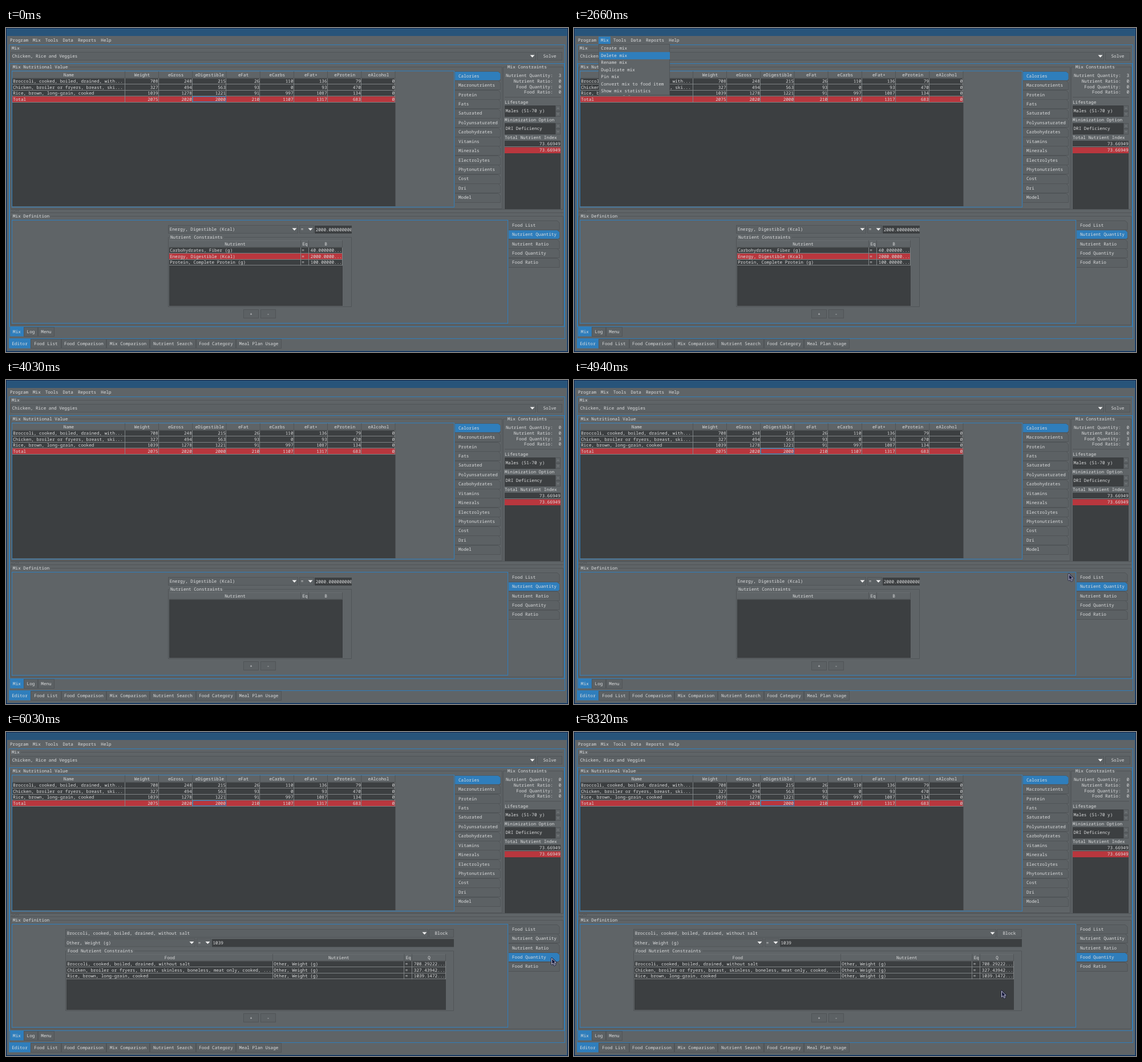
Write an HTML page that moves like this. It is 985 px wide and 569 px high and loops after 9.81 s.

```html
<!DOCTYPE html>
<html lang="en">
<head>
<meta charset="utf-8">
<title>Mix editor</title>
<style>
  html, body { margin: 0; width: 100%; height: 100%; overflow: hidden; background: #5f6467; }
  svg { display: block; width: 985px; height: 569px; }
  text { font: 7.65px "Noto Sans Mono", "DejaVu Sans Mono", monospace; fill: #dcddde;
         text-rendering: geometricPrecision; white-space: pre; }
</style>
</head>
<body>
<svg id="stage" viewBox="0 0 985 569" xmlns="http://www.w3.org/2000/svg"></svg>
<script>
const LOOP = 9810;
const BG = '#5f6467', DARK = '#3c3f41', EDGE = '#505457', LIGHT = '#686d70',
      BLUE = '#2f7ebc', RED = '#b9373e', GRID = '#7f8385', FIELD = '#5c6164';

// Drawing helpers: all boxes are given by two corners, text by its vertical middle.
const rect = (x, y, x2, y2, fill = 'none', stroke = 'none') =>
  `<rect x="${x}" y="${y}" width="${x2 - x}" height="${y2 - y}" fill="${fill}" stroke="${stroke}"/>`;
const path = (d, stroke, fill = 'none') => `<path d="${d}" fill="${fill}" stroke="${stroke}"/>`;
const text = (x, y, s, anchor = 'start') =>
  `<text x="${x}" y="${y + 2.7}" text-anchor="${anchor}">${s}</text>`;
const hline = (x, x2, y, c) => path(`M${x} ${y}H${x2}`, c);
const vline = (x, y, y2, c) => path(`M${x} ${y}V${y2}`, c);
const group = (id, body) => `<g id="${id}">${body}</g>`;
const arrow = (x, y) => path(`M${x - 4} ${y - 2}h8l-4 4.2z`, 'none', '#f4f4f4');
const button = (x, y, x2, y2, s) =>
  rect(x + .5, y + .5, x2 - .5, y2 - .5, FIELD, EDGE) + text((x + x2) / 2, (y + y2) / 2, s, 'middle');
const combo = (x, y, x2, s) =>
  rect(x + .5, y + .5, x2 - .5, y + 14.5, FIELD, EDGE) +
  text(x + 2.7, y + 7.5, s) + arrow(x2 - 6.5, y + 7.5);

function titled(x, y, x2, y2, title, inset = 4) {
  const start = x + inset, end = start + 2 + title.length * 4.6;
  return path(`M${start - 2} ${y + .5}H${x + .5}V${y2 + .5}H${x2 + .5}V${y + .5}H${end}`, EDGE) +
    text(start, y, title);
}

function table(cols, top, bottom, heads, rows, { red = -1, right = false } = {}) {
  const x = cols[0], x2 = cols[cols.length - 1], body = top + 12.5, h = 10.6;
  let s = rect(x, top, x2, body, BG) + rect(x, body, x2, bottom, DARK);
  s += hline(x, x2, top + .5, LIGHT) + hline(x, x2, body - .5, EDGE);
  heads.forEach((name, i) => {
    s += text((cols[i] + cols[i + 1]) / 2, top + 6.3, name, 'middle') +
         vline(cols[i + 1] - .5, top, body, EDGE);
  });
  rows.forEach((row, r) => {
    const y = body + r * h;
    if (r === red) s += rect(x, y, x2, y + h - .6, RED);
    row.forEach((v, c) => {
      s += c && right ? text(cols[c + 1] - 1.5, y + 5, v, 'end')
                      : text(cols[c] + (c === cols.length - 2 ? 2.8 : 1.2), y + 5, v);
    });
    s += hline(x, x2, Math.round(y + h) - .5, GRID);
  });
  if (rows.length)
    for (const c of cols.slice(1)) s += vline(Math.floor(c) - .5, body, body + rows.length * h, GRID);
  return s;
}

const tabY = (y, i) => y + i * 16.43;
const sideTab = (x, x2, y) =>
  path(`M${x} ${y + .8}H${x2 - 4}L${x2} ${y + 4}V${y + 13.5}L${x2 - 2} ${y + 15.7}H${x}z`, 'none', BLUE);
const sideTabs = (x, x2, y, names) => names.map((n, i) => {
  const top = Math.round(tabY(y, i)) + .5;
  return path(`M${x} ${top}H${x2 - 4}L${x2} ${top + 3.5}V${top + 16}H${x}`, EDGE, FIELD);
}).join('');
const sideLabels = (x, y, names) =>
  names.map((n, i) => text(x + 6, tabY(y, i) + 8, n)).join('');

const bottomTabs = (y, edges, names) => names.map((n, i) => {
  const x = edges[i], x2 = edges[i + 1];
  return (i ? rect(x + .5, y + .5, x2 - .5, y + 16.5, FIELD, EDGE) : rect(x, y, x2, y + 16.5, BLUE)) +
    text((x + x2) / 2, y + 8.7, n, 'middle');
}).join('');

function spinner(y, s) {
  const tri = (cy, d) => path(`M965 ${cy + d}h5l-2.5 ${-2.4 * d}z`, 'none', '#73777a');
  return rect(874, y, 972, y + 20, FIELD) + rect(874, y, 963, y + 20, DARK) +
    rect(963.5, y + .5, 971.5, y + 9.5, BG, EDGE) + rect(963.5, y + 10.5, 971.5, y + 19.5, BG, EDGE) +
    tri(y + 5, 1) + tri(y + 15, -1) + text(875.5, y + 9.6, s);
}

const counts = values => values.map((v, i) => text(973, 83.3 + i * 9.8, v, 'end')).join('');

const views = ['Calories', 'Macronutrients', 'Protein', 'Fats', 'Saturated', 'Polyunsaturated',
  'Carbohydrates', 'Vitamins', 'Minerals', 'Electrolytes', 'Phytonutrients', 'Cost', 'Dri', 'Model'];
const parts = ['Food List', 'Nutrient Quantity', 'Nutrient Ratio', 'Food Quantity', 'Food Ratio'];
const menu = ['Create mix', 'Delete mix', 'Rename mix', 'Duplicate mix', 'Pin mix',
  'Convert mix to food item', 'Show mix statistics'];

function windowFrame() {
  const bar = [['Program', 7], ['Mix', 47], ['Tools', 68.7], ['Data', 99.5], ['Reports', 126], ['Help', 166.3]];
  return rect(0, 0, 985, 569, BG) + rect(0, 0, 985, 14, '#28547a') +
    rect(1.5, 1.5, 983.5, 567.5, 'none', '#2b587e') + rect(.5, .5, 984.5, 568.5, 'none', '#0d2148') +
    bar.map(([s, x]) => text(x, 21, s)).join('') +
    rect(5.5, 29.5, 979.5, 545.5, 'none', BLUE) + rect(6.5, 62.5, 978.5, 524.5, 'none', BLUE) +
    bottomTabs(525, [7, 31, 56, 85], ['Mix', 'Log', 'Menu']) +
    bottomTabs(546, [5, 43, 97, 176, 252, 333, 403, 483], ['Editor', 'Food List', 'Food Comparison',
      'Mix Comparison', 'Nutrient Search', 'Food Category', 'Meal Plan Usage']);
}

function upperPane() {
  const cols = [11, 209, 268, 327.3, 386.5, 445.7, 505, 564, 623.3, 682.5];
  const heads = ['Name', 'Weight', 'eGross', 'eDigestible', 'eFat', 'eCarbs', 'eFat+', 'eProtein', 'eAlcohol'];
  const rows = [
    ['Broccoli, cooked, boiled, drained, with...', 708, 248, 215, 26, 110, 136, 79, 0],
    ['Chicken, broiler or fryers, breast, ski...', 327, 494, 563, 93, 0, 93, 470, 0],
    ['Rice, brown, long-grain, cooked', 1039, 1278, 1221, 91, 997, 1087, 134, 0],
    ['Total', 2075, 2020, 2000, 210, 1107, 1317, 683, 0]];
  const limits = ['Nutrient Quantity:', 'Nutrient Ratio:', 'Food Quantity:', 'Food Ratio:'];
  return text(10, 35, 'Mix') + hline(26, 976, 35.5, EDGE) +
    combo(8, 42, 929, 'Chicken, Rice and Veggies') + button(931, 42, 975, 57, 'Solve') +
    titled(8, 68, 869, 317, 'Mix Nutritional Value') + rect(10.5, 75.5, 785.5, 314.5, 'none', BLUE) +
    table(cols, 76, 313, heads, rows, { red: 3, right: true }) +
    sideTabs(787, 866.5, 76, views) + sideTab(787, 866.5, 76) + sideLabels(787, 76, views) +
    titled(871, 68, 976, 318, 'Mix Constraints', 8) +
    limits.map((s, i) => text(958.5, 83.3 + i * 9.8, s, 'end')).join('') + hline(874, 973, 121.5, EDGE) +
    text(874, 130.3, 'Lifestage') + spinner(136, 'Males (51-70 y)') +
    text(874, 161, 'Minimization Option') + spinner(167, 'DRI Deficiency') +
    text(874, 192, 'Total Nutrient Index') + rect(874, 198, 972, 318, DARK) +
    rect(874, 209.5, 972, 220, RED) + hline(874, 972, 208.5, GRID) +
    text(971.5, 203.6, '73.66949', 'end') + text(971.5, 214.5, '73.66949', 'end');
}

function lowerPane() {
  return hline(8, 977, 318.5, EDGE) + hline(8, 977, 324.5, EDGE) +
    path('M9.5 323l3-3 3 3zM16.5 320.5h6l-3 3z', EDGE, LIGHT) +
    titled(8, 330, 976, 521, 'Mix Definition') + rect(10.5, 337.5, 879.5, 518.5, 'none', BLUE) +
    sideTabs(881, 970, 338, parts) +
    button(416, 494, 443, 510, '+') + button(446, 494, 473, 510, '-');
}

const nutrientTable = rows =>
  table([286, 517, 531, 590], 373, 488, ['Nutrient', 'Eq', 'B'], rows, { red: rows.length ? 1 : -1 });

function nutrientForm() {
  return combo(284, 346, 512, 'Energy, Digestible (Kcal)') + combo(514, 346, 540, '=') +
    rect(541, 347, 606, 361, DARK) +
    `<clipPath id="field"><rect x="541" y="346" width="64.5" height="16"/></clipPath>` +
    `<g clip-path="url(#field)">${text(542.7, 354, '2000.0000000000')}</g>` +
    titled(284, 367, 605, 489, 'Nutrient Constraints') + nutrientTable([]);
}

function foodForm() {
  const w = 'Other, Weight (g)';
  return combo(104, 346, 740, 'Broccoli, cooked, boiled, drained, without salt') +
    button(741, 346, 785, 361, 'Block') + combo(103.5, 362.5, 332, w) + combo(334, 362.5, 360, '=') +
    rect(361, 363.5, 785, 377.5, DARK) + text(362.5, 370.3, '1039') +
    titled(104, 384, 784, 489, 'Food Nutrient Constraints') +
    table([106, 468, 698.5, 712, 771], 390, 488, ['Food', 'Nutrient', 'Eq', 'Q'], [
      ['Broccoli, cooked, boiled, drained, without salt', w, '=', '708.29222...'],
      ['Chicken, broiler or fryers, breast, skinless, boneless, meat only, cooked, ...', w, '=', '327.43942...'],
      ['Rice, brown, long-grain, cooked', w, '=', '1039.1472...']]);
}

function popup() {
  return rect(43, 15, 64, 28, BLUE) + text(47, 21, 'Mix') + rect(43.5, 28.5, 167.5, 118, BG, EDGE) +
    group('hover', rect(44, 29.5, 168, 42, BLUE)) +
    menu.map((s, i) => text(47.3, 35.5 + i * 12.5, s)).join('');
}

function pointer() {
  const d = 'M.5 .5V11L3 8.8L4.9 12.6L6.8 11.6L5 8H8.2Z';
  const layer = (fill, stroke, w) =>
    `<path d="${d}" fill="${fill}" stroke="${stroke}" stroke-width="${w}" stroke-linejoin="round"/>`;
  return layer('none', '#15183c', 2.6) + layer('#15183c', '#e8e8f0', .9);
}

document.getElementById('stage').innerHTML =
  windowFrame() + upperPane() + lowerPane() +
  group('focus', rect(327.5, 120.5, 385.5, 129.5, 'none', BLUE)) +
  group('before', counts([3, 0, 0, 0])) + group('after', counts([0, 0, 3, 0])) +
  group('nutrients', nutrientForm() + sideTab(881, 970, tabY(338, 1))) +
  group('filled', nutrientTable([
    ['Carbohydrates, Fiber (g)', '=', '40.000000...'],
    ['Energy, Digestible (Kcal)', '=', '2000.0000...'],
    ['Protein, Complete Protein (g)', '=', '100.00000...']])) +
  group('foods', foodForm() + sideTab(881, 970, tabY(338, 3))) +
  sideLabels(881, 338, parts) + group('popup', popup()) + group('pointer', pointer());

const play = (id, frames) =>
  document.getElementById(id).animate(frames, { duration: LOOP, iterations: Infinity });

// Hard switches: each [time, value] holds until the next one.
function hold(id, prop, steps) {
  const frames = steps.map(([t, v]) => ({ offset: t / LOOP, [prop]: v, easing: 'steps(1, end)' }));
  play(id, [...frames, { offset: 1, [prop]: steps[steps.length - 1][1] }]);
}
const show = (id, ...steps) => hold(id, 'opacity', steps);

show('focus', [0, 1], [2090, 0], [4090, 1]);
show('before', [0, 1], [4030, 0]);
show('after', [0, 0], [4030, 1]);
show('filled', [0, 1], [4030, 0]);
show('nutrients', [0, 1], [6030, 0]);
show('foods', [0, 0], [6030, 1]);
show('popup', [0, 0], [2090, 1], [4030, 0]);
show('hover', [0, 0], [2550, 1]);
show('pointer', [0, 0], [4780, 1]);
hold('hover', 'transform', [[0, 0], [2550, 0], [2632, 1], [2715, 2], [2797, 3], [2880, 4]]
  .map(([t, row]) => [t, `translate(0px, ${row * 12.5}px)`]));

const route = [[0, 836, 317], [4780, 836, 317], [5090, 895, 362], [5370, 953, 400], [5510, 956, 397],
  [6270, 956, 397], [6560, 850, 436], [6870, 762, 466], [7080, 749, 470], [7730, 749, 470],
  [8320, 749, 454.5], [LOOP, 749, 454.5]];
play('pointer', route.map(([t, x, y]) => ({ offset: t / LOOP, transform: `translate(${x}px, ${y}px)` })));
</script>
</body>
</html>
```
